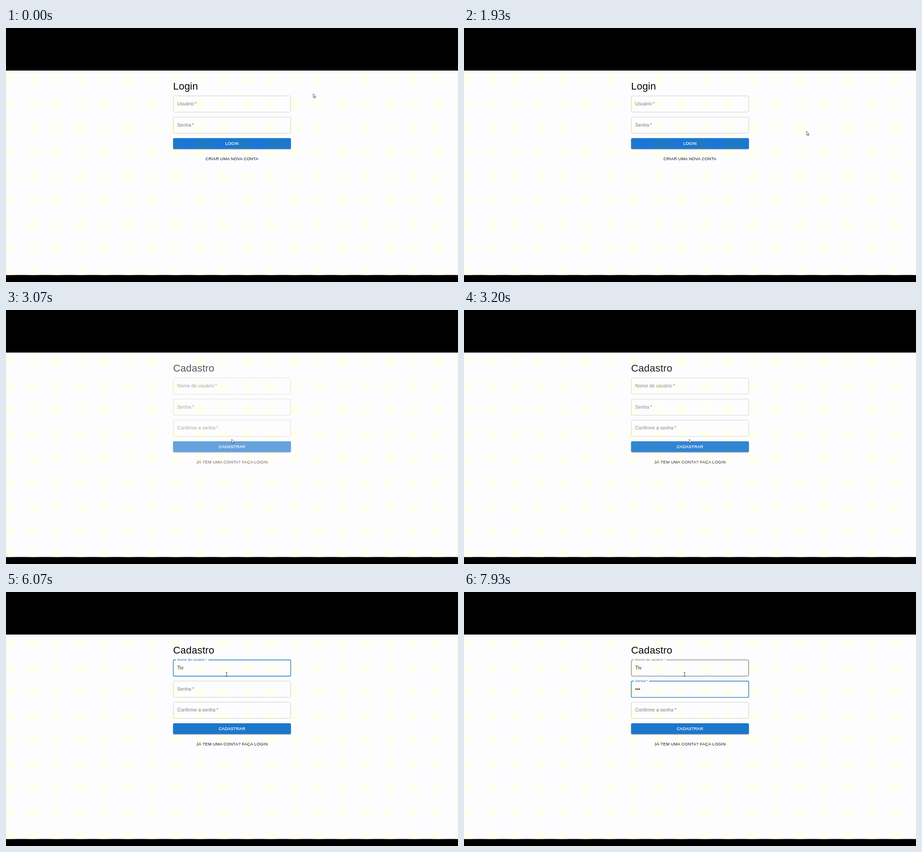
Animation, 998 px wide and 561 px high, one loop 8000 ms. Source, as an HTML page:

```html
<!DOCTYPE html>
<html lang="pt-BR">
<head>
<meta charset="utf-8">
<title>Cadastro</title>
<style>
  html, body { margin: 0; width: 100%; height: 100%; overflow: hidden; background: #000; }
  svg { display: block; width: 998px; height: 561px; }
  text { font-family: "Liberation Sans", Arial, sans-serif; white-space: pre; }
  .title { font-size: 22.1px; letter-spacing: .16px; }
  .field { font-size: 10.5px; letter-spacing: .1px; }
  .button { font-size: 9.15px; letter-spacing: .26px; text-anchor: middle; }
  .raised { filter: drop-shadow(0 1px 1px rgba(0, 0, 0, .4)); }
</style>
</head>
<body>
<svg viewBox="0 0 998 561">
  <defs>
    <radialGradient id="glow">
      <stop offset=".35" stop-color="#fffff0"/>
      <stop offset="1" stop-color="#fffff0" stop-opacity="0"/>
    </radialGradient>
    <pattern id="dots" x="33.75" y="87.3" width="52.5" height="53.4" patternUnits="userSpaceOnUse">
      <circle cx="26.25" cy="26.7" r="18" fill="url(#glow)"/>
    </pattern>
    <linearGradient id="blue" gradientUnits="userSpaceOnUse" x1="400" x2="439" spreadMethod="reflect">
      <stop offset=".15" stop-color="#1976d8"/>
      <stop offset=".8" stop-color="#1f79c4"/>
    </linearGradient>
  </defs>
  <rect y="94" width="998" height="451.5" fill="#fdfdff"/>
  <rect y="94" width="998" height="451.5" fill="url(#dots)"/>
  <g id="scene"></g>
</svg>
<script>
const LOOP = 8000, BLUE = '#1b76c0';
const HOVER_LINK = 2300, OPEN_SIGNUP = 2850, FOCUS_NAME = 3720, FOCUS_PASSWORD = 6750;
const LEFT = 369, WIDTH = 260, FIELD_H = 36.2, CENTER = 499;
const NAME_KEYS = [5100, 5300, 5500], PASSWORD_KEYS = [7000, 7200, 7400];

// Pointer hot spot: time, x, y
const pointerPath = [
  [0, 678, 145], [420, 877, 190], [830, 756, 228], [1930, 756, 228], [2410, 502, 286],
  [2900, 502, 286], [3150, 497, 285], [3330, 497, 285], [3680, 487, 182], [LOOP, 487, 182]
];

const scene = document.getElementById('scene');
const measure = document.createElement('canvas').getContext('2d');
measure.font = '10.5px "Liberation Sans", Arial, sans-serif';

const clamp = v => Math.max(0, Math.min(1, v));
const smooth = v => v * v * (3 - 2 * v);
const easeOut = v => 1 - (1 - v) ** 2;
const progress = (t, start, length) => clamp((t - start) / length);
const typed = (text, keys, t) => text.slice(0, keys.filter(k => k <= t).length);

function pointerAt(t) {
  const i = pointerPath.findIndex(p => p[0] > t);
  const [t0, x0, y0] = pointerPath[i - 1], [t1, x1, y1] = pointerPath[i];
  const k = smooth((t - t0) / (t1 - t0));
  return { x: x0 + (x1 - x0) * k, y: y0 + (y1 - y0) * k };
}

const text = (kind, x, y, content, fill, extra = '') =>
  `<text class="${kind}" x="${x}" y="${y}" fill="${fill}" ${extra}>${content}</text>`;

function field(y, label, pointer, t, { value = '', notch = 0, focus = Infinity, blur = Infinity, keys = [] } = {}) {
  const focused = t >= focus && t < blur;
  const float = easeOut(progress(t, focus, 200));
  const hovered = pointer.x > LEFT && pointer.x < LEFT + WIDTH && pointer.y > y && pointer.y < y + FIELD_H;
  const stroke = focused ? BLUE : hovered ? '#4a4a4a' : '#c9c9c6';
  const gap = notch * float, right = LEFT + WIDTH - .4, bottom = y + FIELD_H - .4;
  const outline = `M${375 + gap} ${y}H${right - 2.5}q2.5 0 2.5 2.5V${bottom - 2.5}q0 2.5 -2.5 2.5` +
    `H${LEFT + 2.9}q-2.5 0 -2.5 -2.5V${y + 2.5}q0 -2.5 2.5 -2.5H375`;
  let out = `<path d="${outline}" fill="none" stroke="${stroke}" stroke-width="${focused ? 1.4 : .9}"/>`;
  out += text('field', 0, 0, label + '\u2009*', focused ? BLUE : '#7b7b7b',
    `transform="translate(378 ${y + 20.8 - 18.4 * float}) scale(${1 - .25 * float})"`);
  const shown = typed(value, keys, t);
  out += text('field', 378, y + 21.3, shown, '#262626');
  const lastInput = Math.max(focus, ...keys.filter(k => k <= t));
  if (focused && Math.floor((t - lastInput) / 500) % 2 === 0) {
    const x = 378.3 + measure.measureText(shown).width + shown.length * .1;
    out += `<rect x="${x}" y="${y + 12}" width=".8" height="12" fill="#222"/>`;
  }
  return out;
}

const button = (y, label, fill) =>
  `<rect class="raised" x="${LEFT}" y="${y}" width="${WIDTH}" height="23.8" rx="2.5" fill="${fill}"/>` +
  text('button', CENTER, y + 15.1, label, '#fff', 'stroke="#fff" stroke-width=".25"');

function loginPage(t, pointer) {
  const hover = easeOut(progress(t, HOVER_LINK, 250));
  const shade = Math.round(15 + 240 * hover);
  return text('title', 369, 135.8, 'Login', '#050505') +
    field(150, 'Usuário', pointer, t) +
    field(196.8, 'Senha', pointer, t) +
    button(243.3, 'LOGIN', 'url(#blue)') +
    `<rect x="${LEFT}" y="277.4" width="${WIDTH}" height="23.8" rx="2.5" fill="#1976c4" opacity="${hover}"/>` +
    text('button', CENTER, 292.2, 'CRIAR UMA NOVA CONTA', `rgb(${shade},${shade},${shade})`);
}

function signupPage(t, pointer) {
  return `<g opacity="${easeOut(progress(t, OPEN_SIGNUP, 520))}">` +
    text('title', 369, 135.8, 'Cadastro', '#050505') +
    field(150, 'Nome de usuário', pointer, t,
      { value: 'Tiv', notch: 72, focus: FOCUS_NAME, blur: FOCUS_PASSWORD, keys: NAME_KEYS }) +
    field(196.8, 'Senha', pointer, t,
      { value: '•••', notch: 34, focus: FOCUS_PASSWORD, keys: PASSWORD_KEYS }) +
    field(243.4, 'Confirme a senha', pointer, t) +
    button(290, 'CADASTRAR', '#1b77cc') +
    text('button', CENTER, 338.8, 'JÁ TEM UMA CONTA? FAÇA LOGIN', '#111') + '</g>';
}

const cursors = {
  arrow: '<path d="M.3 .3V8.7L2.2 7L3.5 9.9L4.9 9.3L3.6 6.5H6.2Z" fill="#fff" stroke="#333" stroke-width=".8"/>',
  hand: '<path d="M-.8 .8Q0 -.4 .8 .8V4.2L4.2 5Q5 5.3 4.9 6.3L4.3 9.3L3.5 11.2H-.8L-3.2 7.6Q-3.6 6.4 -2.3 6.4L-.8 7.5Z" fill="#fff" stroke="#444" stroke-width=".7"/>',
  beam: '<path d="M-2 -4H2M-2 4.2H2M0 -4V4.2" fill="none" stroke="#333" stroke-width=".9"/>'
};

function cursorKind(t, { x, y }) {
  if (x < LEFT || x > LEFT + WIDTH) return 'arrow';
  if (t < OPEN_SIGNUP) return y > 243 && y < 267 || y > 277 ? 'hand' : 'arrow';
  const overField = [150, 196.8, 243.4].some(top => y > top && y < top + FIELD_H);
  return overField ? 'beam' : y > 290 ? 'hand' : 'arrow';
}

function render() {
  const t = performance.now() % LOOP;
  const pointer = pointerAt(t);
  scene.innerHTML = (t < OPEN_SIGNUP ? loginPage : signupPage)(t, pointer) +
    `<g transform="translate(${pointer.x} ${pointer.y})">${cursors[cursorKind(t, pointer)]}</g>`;
  requestAnimationFrame(render);
}
render();
</script>
</body>
</html>
```
